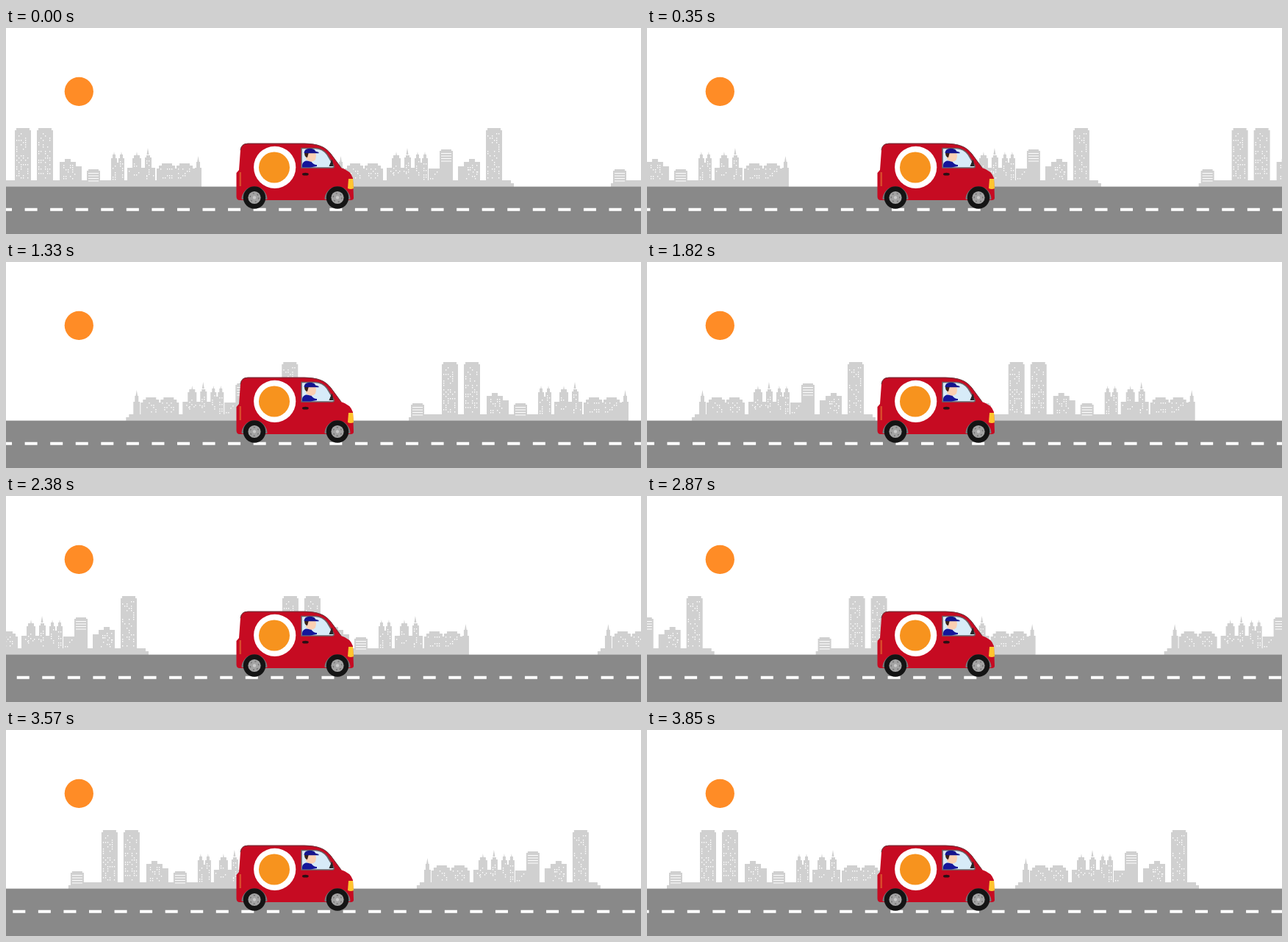
An HTML page that plays this animation: 864 by 280 pixels, repeating every 3.92 s.

```html
<!DOCTYPE html>
<html lang="en">
<head>
<meta charset="utf-8">
<title>Delivery van</title>
<style>
html, body { margin: 0; width: 100%; height: 100%; overflow: hidden; background: #fff; }
svg { display: block; width: 864px; height: 280px; }
</style>
</head>
<body>
<svg viewBox="0 0 864 280">
  <defs>
    <g id="city"><path id="walls" fill="#d0d0d0"/><path id="lights" fill="#fff"/></g>
    <g id="wheel">
      <circle r="15.2" fill="#141414"/>
      <g class="hub">
        <circle r="8.6" fill="#a3a3a3"/>
        <circle r="5.8" fill="none" stroke="#777" stroke-width="1.5" stroke-dasharray="2.1 3.97"/>
        <circle r="2.2" fill="#c9c9c9"/>
      </g>
    </g>
  </defs>
  <rect width="864" height="280" fill="#fff"/>
  <circle cx="99.3" cy="86.3" r="19.6" fill="#ff8c26"/>
  <use id="city1" href="#city"/>
  <use id="city2" href="#city"/>
  <rect y="215.6" width="864" height="65" fill="#898989"/>
  <path id="dashes" d="M0 246.7H940" stroke="#fff" stroke-width="4"/>

  <g id="van">
    <path d="M313.5 229V197L317 193L319 166Q320 156.8 329 156.8H406C424 157 434 161 442 171L456 190Q469 194 472 204L473 231Q473 234 469 234H318Q313.5 234 313.5 229Z" fill="#c60b22"/>
    <path d="M319 166Q320 157.2 329 157.2H406C424 157.4 434 161 442 171L456 190" fill="none" stroke="#65343a" stroke-width="1"/>
    <path d="M317.5 196H320V215H317.5Z" fill="#d94a2b"/>
    <path d="M320.5 233A17.5 17.5 0 0 1 355.5 233ZM433.5 233A17.5 17.5 0 0 1 468.5 233Z" fill="#77777a"/>
    <path d="M466 205H472L473 218Q469 220 465 218Z" fill="#ffc52e"/>
    <path d="M402 163.5H421Q431 164 437 172L446 187Q447 190 444 190H402Z" fill="#d7ebf8" stroke="#6a6064" stroke-width="1.5"/>
    <path d="M403 189.5Q402 182 408 180.5L415 181Q418 186 423 186V188L414 189.5Z" fill="#15169a"/>
    <path d="M408 169H421L422 174L421 179Q417 183 412 181L408 178Z" fill="#fbd0b2"/>
    <path d="M406 169H412L410 176Q406 176 406 169Z" fill="#382018"/>
    <path d="M405.5 170Q406 163.8 413 163.8Q420 163.8 421 167.5L425.5 169V170.3H412Z" fill="#15158c"/>
    <path d="M440 188L443.5 179.5L445 188" fill="#252529" stroke="#252529"/>
    <ellipse cx="407.4" cy="198.7" rx="4.4" ry="1.9" fill="#291014"/>
    <circle cx="365.7" cy="189.3" r="28.6" fill="#fff"/>
    <circle cx="365" cy="189.5" r="21" fill="#f7931e"/>
    <use href="#wheel" x="338" y="230.5"/>
    <use href="#wheel" x="451" y="230.5"/>
  </g>
</svg>
<script>
const STEP = 70, STEPS = 56, GROUND = 216;
const DASH = 17, PITCH = 864 / 25;
const $ = id => document.getElementById(id);

let seed = 7;
const rand = () => (seed = seed * 16807 % 2147483647) / 2147483647;

let walls = '', lights = '';

// Building with an optional raised roof and randomly lit windows
function block(x, w, top, odds = 0, inset = 0, rise = 0) {
  walls += `M${x} ${GROUND}V${top}h${inset}v${-rise}h${w - 2 * inset}v${rise}h${inset}V${GROUND}z`;
  for (let y = top + 4; y < 206; y += 3)
    for (let i = x + 2; i < x + w - 2; i += 3)
      if (rand() < odds) lights += `M${i} ${y}h1.3v1.4h-1.3z`;
}

function needle(x, top) {
  walls += `M${x - 1.5} ${top + 9}L${x} ${top}L${x + 1.5} ${top + 9}z`;
}

const tower = x => block(x, 22, 139, .36, 2, 3);

function kiosk(x, top) {
  block(x, 18, top, 0, 2, 2);
  for (let y = top + 3; y < top + 16; y += 3.5) lights += `M${x + 2} ${y}h14v1h-14z`;
}

function twins(x) {
  block(x, 18, 183);
  for (const i of [x, x + 10]) {
    block(i, 8, 177, .4, 2, 5);
    needle(i + 4, 168);
  }
}

function domes(x) {
  block(x, 38, 190, .1);
  block(x + 7, 12, 177, .3, 2, 4);
  block(x + 24, 9, 176, .3, 2, 3);
  needle(x + 13, 168);
  needle(x + 28, 163);
}

function hall(x) {
  block(x, 52, 191);
  for (const i of [x + 3, x + 27]) block(i, 22, 187, .35, 4, 3);
}

function office(x, shift) {
  block(x, 30, 188, .2);
  block(x + shift, 22, 182, .25, 7, 4);
}

function mast(x) {
  block(x, 9, 190, 0, 2, 8);
  needle(x + 4.5, 174);
}

// Stepped footing under a whole district
function footing(x, w) {
  block(x, w, 211);
  block(x + 4, w - 8, 207);
}

function twinDistrict(x) {
  footing(x, 299);
  kiosk(x + 3, 194);
  tower(x + 45);
  tower(x + 75);
  office(x + 106, 0);
  kiosk(x + 143, 194);
  twins(x + 176);
  domes(x + 198);
  hall(x + 238);
  mast(x + 290);
}

function towerDistrict(x) {
  footing(x, 250);
  mast(x + 10);
  hall(x + 20);
  domes(x + 77);
  twins(x + 115);
  block(x + 134, 16, 191, .2);
  kiosk(x + 149, 167);
  office(x + 174, 8);
  tower(x + 212);
}

twinDistrict(-33);
towerDistrict(441);
$('walls').setAttribute('d', walls);
$('lights').setAttribute('d', lights);
$('dashes').setAttribute('stroke-dasharray', `${DASH} ${PITCH - DASH}`);

const move = (id, x) => $(id).setAttribute('transform', `translate(${x.toFixed(2)} 0)`);
const hubs = document.querySelector('.hub');

function draw(ms) {
  const n = Math.floor(ms / STEP) % STEPS;
  move('city1', -14.617 * n);
  move('city2', 856 - 14.473 * n);
  move('dashes', (25.6 - 14.55 * n) % PITCH - PITCH);
  hubs.setAttribute('transform', `rotate(${n * 45})`);
}

const start = performance.now();
function tick() {
  draw(performance.now() - start);
  requestAnimationFrame(tick);
}
tick();
</script>
</body>
</html>
```
